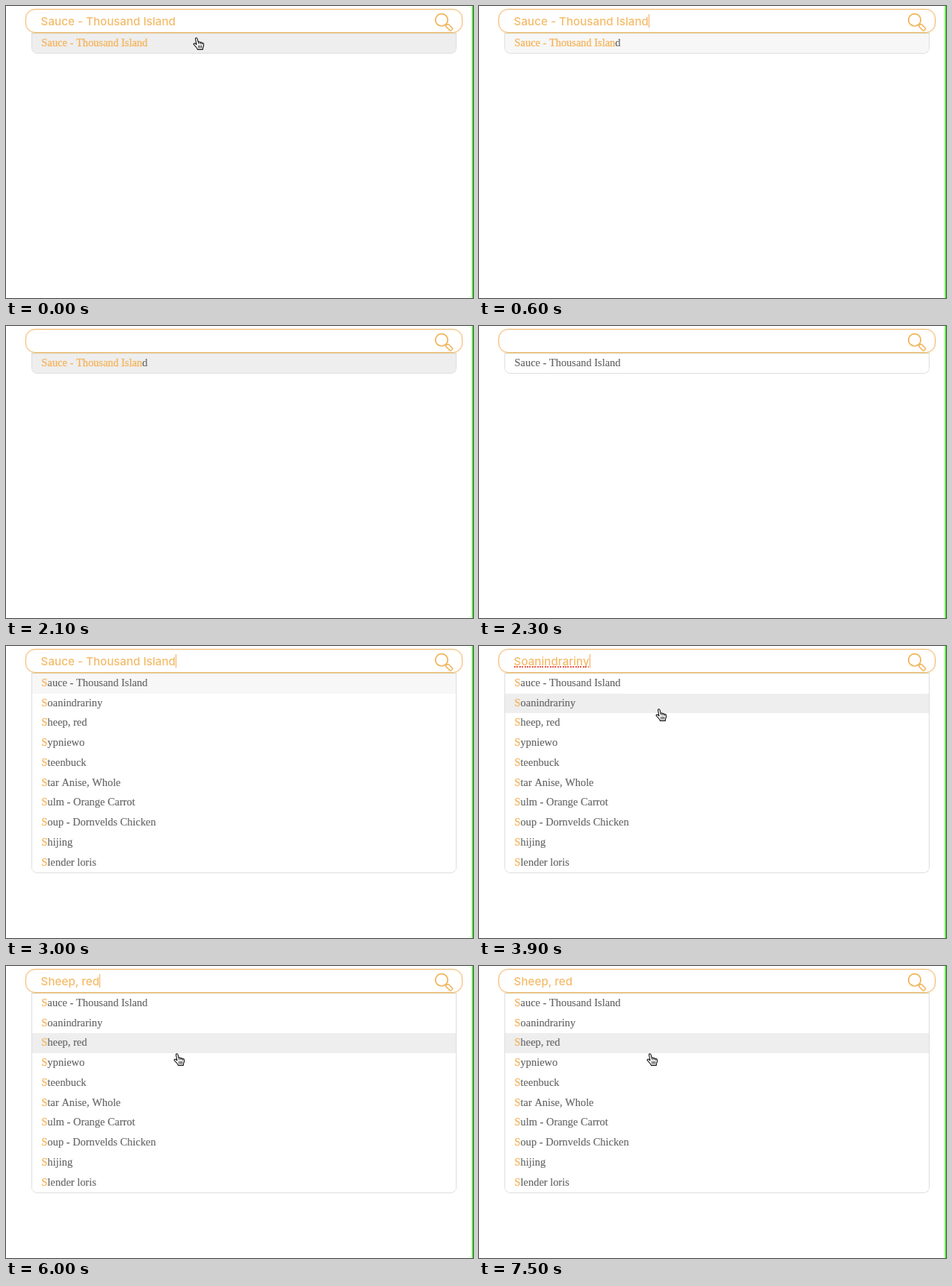
Write an HTML page that moves like this. It is 625x392 px and loops after 8 s.

```html
<!DOCTYPE html>
<html lang="en">
<head>
<meta charset="utf-8">
<title>Search suggestions</title>
<style>
html, body { margin: 0; width: 100%; height: 100%; overflow: hidden; background: #fff; }
#stage { position: relative; width: 625px; height: 392px; overflow: hidden; background: #fff; }
#stage > * { position: absolute; box-sizing: border-box; }
#list {
  left: 34px; top: 35.9px; width: 569px; overflow: hidden;
  border: 1px solid #dedede; border-top-color: #d9d3b6; border-radius: 0 0 8px 8px;
  font: 14.4px/25.9px "Liberation Serif", "Times New Roman", serif; font-kerning: none;
  color: #666; -webkit-text-stroke: .15px;
}
.row { height: 26.75px; padding-left: 12.6px; white-space: pre; }
.row b { font-weight: 400; color: #f5b55c; -webkit-text-stroke: .3px; }
#box {
  left: 26px; top: 4px; width: 585px; height: 32px;
  border: 1px solid #f1b96c; border-radius: 13px; background: #fff;
  box-shadow: 0 0 3px rgba(241, 185, 108, .4);
}
#field {
  left: 46.6px; top: 11px; height: 20px; white-space: pre;
  font: 500 15.2px/20px Inter, "Open Sans", sans-serif; color: #f4bb69;
}
#caret { position: absolute; left: 100%; top: 0; width: 1px; height: 18px; background: #f0ae58; }
#spell {
  left: 47px; top: 27px; width: 100px; height: 2px;
  background: repeating-linear-gradient(90deg, #f0574c 0 2px, transparent 2px 3.4px);
}
#edge { left: 623px; top: 0; width: 2px; height: 392px;
  background: linear-gradient(90deg, #a6ff9c 50%, #1bff00 50%); }
#lens { left: 570px; top: 5px; }
#hand { left: -.5px; top: -.5px; }
</style>
</head>
<body>
<div id="stage">
  <div id="list"></div>
  <div id="box"></div>
  <div id="field"><span id="value"></span><i id="caret"></i></div>
  <div id="spell"></div>
  <svg id="lens" width="32" height="32" fill="none" stroke="#f3b863" stroke-linejoin="round">
    <circle cx="13" cy="13.7" r="8.2" stroke-width="1.9"/>
    <path d="M18.8 19.4l1.6 1.6" stroke-width="2"/>
    <rect x="0" y="-2.3" width="9.4" height="4.6" rx="1.5" stroke-width="1.6" transform="translate(19.9 20.4) rotate(45)"/>
  </svg>
  <svg id="hand" width="17" height="19" fill="#fff" stroke="#111" stroke-width="1.1" stroke-linejoin="round" stroke-linecap="round">
    <path d="M3.6 2.6Q3.3 .9 4.6 .8Q5.7 .7 6.1 2.1L7.3 6.5Q8.9 5.3 9.8 7Q11.4 6 12.2 7.7Q14.2 7.1 14.5 9.3Q14.8 11.7 13.6 13.6L13.3 16.4H6.5Q5.4 14 3.5 12.2Q1.6 10.3 1.1 9.3Q1.1 7.9 2.5 8.1Q3.6 8.4 5 9.9Z"/>
    <path d="M7.4 6.6l.6 2.2M9.8 7l.5 2M12.2 7.8l.3 1.6M7.7 11.2v3M9.6 11.2v3M11.5 11.2v3" stroke-width=".9"/>
  </svg>
  <div id="edge"></div>
</div>
<script>
const $ = id => document.getElementById(id);
const items = ["Sauce - Thousand Island", "Soanindrariny", "Sheep, red", "Sypniewo", "Steenbuck",
  "Star Anise, Whole", "Sulm - Orange Carrot", "Soup - Dornvelds Chicken", "Shijing", "Slender loris"];
const [sauce, soan, sheep] = items;
const loop = 8000, full = "#eee", half = "#f7f7f7";

// Each step changes only what it names; tint maps row to background.
const steps = [
  { t: 0, text: sauce, caret: 0, rows: 1, match: 23, tint: { 0: full }, hand: [250, 42] },
  { t: 200, text: sauce.slice(0, -1), caret: 1, hand: null },
  { t: 600, text: sauce, match: 22, tint: { 0: half } },
  { t: 700, tint: { 0: full } },
  { t: 1100, caret: 0 },
  { t: 1600, caret: 1 },
  { t: 1900, text: "" },
  { t: 2100, caret: 0 },
  { t: 2300, match: 0, tint: {} },
  { t: 2600, text: "s", caret: 1 },
  { t: 3000, text: sauce, rows: 10, match: 1, tint: { 0: half } },
  { t: 3100, tint: { 0: full } },
  { t: 3500, caret: 0 },
  { t: 3700, hand: [247, 53] },
  { t: 3800, text: soan, caret: 1, tint: { 0: half, 1: half }, hand: [242, 67] },
  { t: 3900, tint: { 1: full }, hand: [236, 84] },
  { t: 4000, text: sheep, tint: { 1: half, 2: half }, hand: [228, 104] },
  { t: 4100, tint: { 2: full }, hand: [224, 117] }
];
for (let t = 4500; t < loop; t += 500) steps.push({ t, caret: t / 500 % 2 ? 0 : 1 });

const rows = items.map(name => {
  const row = document.createElement("div");
  const hit = document.createElement("b");
  const rest = document.createElement("span");
  row.className = "row";
  row.append(hit, rest);
  $("list").append(row);
  return { row, hit, rest, name };
});

function draw(s) {
  $("value").textContent = s.text;
  $("caret").style.opacity = s.caret;
  $("spell").style.display = s.text === soan ? "" : "none";
  $("list").style.height = s.rows > 1 ? "269px" : "28px";
  rows.forEach(({ row, hit, rest, name }, i) => {
    row.style.display = i < s.rows ? "" : "none";
    row.style.background = s.tint[i] || "#fff";
    hit.textContent = name.slice(0, s.match);
    rest.textContent = name.slice(s.match);
  });
  $("hand").style.display = s.hand ? "" : "none";
  if (s.hand) $("hand").style.transform = `translate(${s.hand[0]}px, ${s.hand[1]}px)`;
}

let start = null, last = -1;
function tick(now) {
  if (start === null) start = now;
  const t = (now - start) % loop;
  const past = steps.filter(s => s.t <= t);
  if (past.length !== last) {
    last = past.length;
    draw(Object.assign({}, ...past));
  }
  requestAnimationFrame(tick);
}
draw(steps[0]);
requestAnimationFrame(tick);
</script>
</body>
</html>
```
